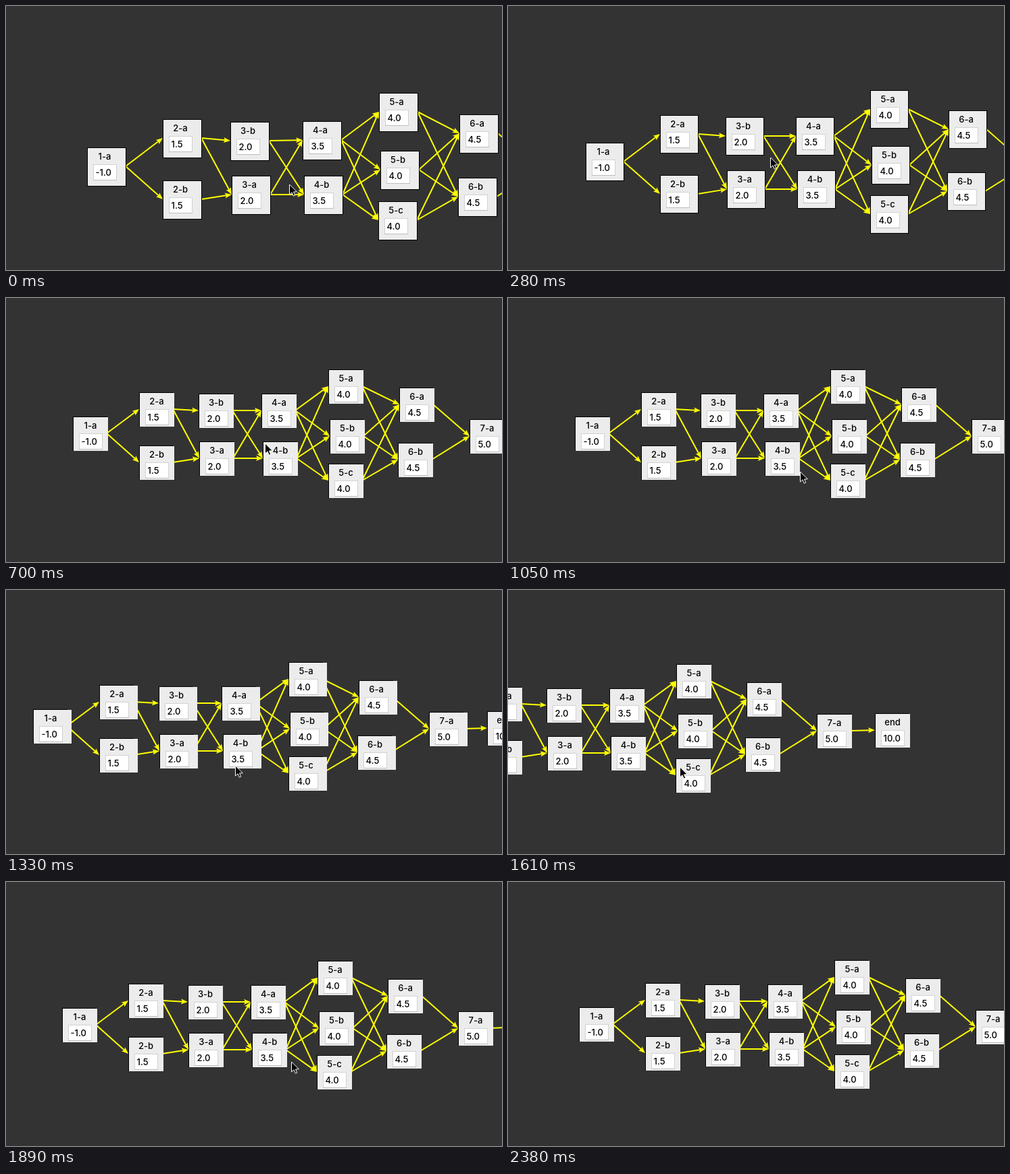
Recreate the animation shown at these times as an HTML page with a canvas. Size 734 by 392 pixels, loop 2940 ms.

```html
<!DOCTYPE html>
<html lang="en">
<head>
<meta charset="utf-8">
<title>Node graph</title>
<style>
  html, body { margin: 0; width: 100%; height: 100%; overflow: hidden; background: #333; }
  canvas { display: block; }
</style>
</head>
<body>
<canvas id="stage" width="734" height="392"></canvas>
<script>
const ctx = document.getElementById('stage').getContext('2d');
const LOOP = 2940, STEP = 70;
const SIDE = 50.3;
const POINTER_END = 34;

// Each column: shared value, then the node places at zoom 1
const columns = [
  ['-1.0', [0, 0]],
  ['1.5', [98.5, -36.5], [98.5, 43.2]],
  ['2.0', [187.5, 37], [186, -33.7]],
  ['3.5', [279.4, -34], [281.4, 37]],
  ['4.0', [378.5, -70.5], [380.2, 4.4], [377.8, 70.2]],
  ['4.5', [482.7, -43], [480.6, 39.2]],
  ['5.0', [586.7, 4.4]],
  ['10.0', [672, 3]]
].map(([value, ...places], i, all) => places.map(([x, y], j) => ({
  name: i === all.length - 1 ? 'end' : `${i + 1}-${'abc'[j]}`, value, x, y
})));
const nodes = columns.flat();

// Every node feeds the whole next column, apart from one missing link
const links = columns.slice(1)
  .flatMap((column, i) => columns[i].flatMap(from => column.map(to => [from, to])))
  .filter(([from, to]) => !(from.name === '2-b' && to.name === '3-b'));

// [step, x, y, zoom]: zoom out twice, then drag left and back
const camera = [
  [3, 120.4, 210.5, 1.142], [5, 111.5, 196.4, 1.0825],
  [8, 111.5, 196.4, 1.0825], [10, 99.45, 176.5, 1],
  [17, 99.45, 176.5, 1], [23, -128.9, 180.5, 1],
  [28, 107.7, 188.5, 1], [29, 105.45, 186.5, 1]
];

// [step, x, y]
const pointer = [
  [0, 419, 264], [2, 388, 224], [6, 388, 224], [7, 383, 215],
  [12, 383, 215], [15, 432, 257], [19, 339, 260], [21, 225, 261],
  [23, 254, 262], [27, 422, 266], [29, 430, 260], [32, 430, 260], [33, 456, 291]
];

const smooth = p => p * p * (3 - 2 * p);

function sample(track, step) {
  const i = track.findIndex(key => key[0] >= step);
  if (i < 0) return track[track.length - 1].slice(1);
  if (i === 0) return track[0].slice(1);
  const [t1, ...a] = track[i - 1], [t2, ...b] = track[i];
  const p = smooth((step - t1) / (t2 - t1));
  return a.map((v, j) => v + (b[j] - v) * p);
}

function polygon(points) {
  ctx.beginPath();
  points.forEach(([x, y]) => ctx.lineTo(x, y));
  ctx.closePath();
}

function fillBox(color, x, y, w, h) {
  ctx.fillStyle = color;
  ctx.fillRect(x, y, w, h);
}

function drawArrow(x1, y1, x2, y2) {
  ctx.save();
  ctx.translate(x2, y2);
  ctx.rotate(Math.atan2(y2 - y1, x2 - x1));
  ctx.strokeStyle = ctx.fillStyle = '#ff0';
  ctx.lineWidth = 2;
  ctx.beginPath();
  ctx.moveTo(-Math.hypot(x2 - x1, y2 - y1), 0);
  ctx.lineTo(-7, 0);
  ctx.stroke();
  polygon([[0, 0], [-10, 4], [-8, 0], [-10, -4]]);
  ctx.fill();
  ctx.restore();
}

function drawNode({ name, value }, x, y, size, trail) {
  fillBox('#000', x, y, size + 1, size + 1);
  fillBox('#ececec', x + 1, y + 1, size - 1, size - 1);
  // The panel keeps its size whatever the zoom
  fillBox('#ececec', x + 1, y + 1, 51 + trail, 50);

  fillBox('#d2d2d2', x + 9, y + 25, 35, 24);
  fillBox('#bdbdbd', x + 9, y + 48, 35, 1);
  fillBox('#fff', x + 10, y + 26, 33, 22);

  ctx.fillStyle = '#000';
  ctx.font = '500 13px Inter, Roboto, sans-serif';
  ctx.textAlign = 'center';
  ctx.fillText(name, x + 26, y + 18);
  ctx.textAlign = 'left';
  ctx.fillText(value, x + 12.5, y + 42);
}

function drawPointer(x, y) {
  ctx.save();
  ctx.translate(Math.round(x) + 0.5, Math.round(y) + 1);
  polygon([[0, 0], [0, 15], [3.5, 11.8], [5.8, 17.2], [8.2, 16.2], [6, 11], [10.8, 10.8]]);
  ctx.fillStyle = '#000';
  ctx.strokeStyle = '#fff';
  ctx.lineWidth = 1;
  ctx.fill();
  ctx.stroke();
  ctx.restore();
}

function draw(step) {
  const [camX, camY, zoom] = sample(camera, step);
  const speed = camX - sample(camera, step - 1)[0];
  const trail = speed < -20 ? 5 : 0;
  const size = Math.round(SIDE * zoom), half = Math.floor(size / 2);
  const place = node => [camX + node.x * zoom, camY + node.y * zoom].map(Math.floor);

  fillBox('#333', 0, 0, 734, 392);
  for (const [from, to] of links) {
    const [x1, y1] = place(from), [x2, y2] = place(to);
    drawArrow(x1 + size, y1 + half, x2, y2 + half);
  }
  for (const node of nodes) drawNode(node, ...place(node), size, trail);
  if (step < POINTER_END) drawPointer(...sample(pointer, step));
}

const start = performance.now();
function tick() {
  const time = (performance.now() - start) % LOOP;
  draw(Math.floor(time / STEP));
  requestAnimationFrame(tick);
}
tick();
</script>
</body>
</html>
```
